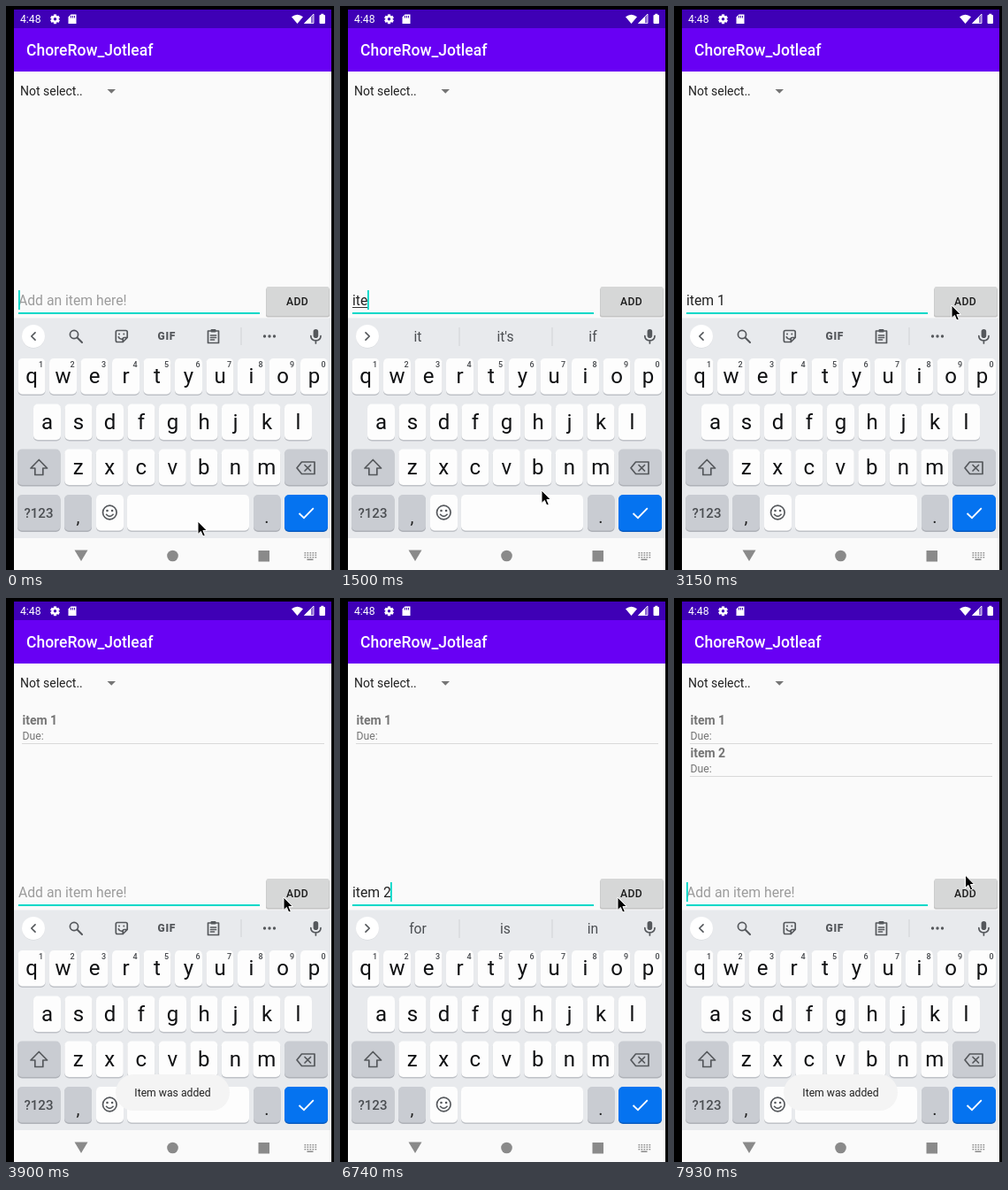
Write an HTML page that moves like this. It is 371 px wide and 637 px high and loops after 8000 ms.

```html
<!DOCTYPE html>
<html lang="en">
<head>
<meta charset="utf-8">
<title>Todo app</title>
<style>
html, body { margin: 0; width: 100%; height: 100%; overflow: hidden; background: #000; }
svg { display: block; width: 371px; height: 637px; font-family: Roboto, "Noto Sans", sans-serif; }
text { white-space: pre; }
.mid { text-anchor: middle; }
.line { fill: none; stroke: #55585c; stroke-width: 1.7; stroke-linejoin: round; stroke-linecap: round; }
</style>
</head>
<body>
<svg id="stage" viewBox="0 0 371 637" xmlns="http://www.w3.org/2000/svg"></svg>
<script>
const LOOP = 8000;
const TEAL = '#03d8c8', INK = '#55585c';

const rect = (x, y, w, h, fill, more = '') =>
  `<rect x="${x}" y="${y}" width="${w}" height="${h}" fill="${fill}" ${more}/>`;
const text = (x, y, size, fill, str, more = '') =>
  `<text x="${x}" y="${y}" font-size="${size}" fill="${fill}" ${more}>${str}</text>`;
const path = (d, more = `fill="${INK}"`) => `<path d="${d}" ${more}/>`;
const line = (d, more = '') => path(d, `class="line" ${more}`);
const circle = (x, y, r, more) => `<circle cx="${x}" cy="${y}" r="${r}" ${more}/>`;

function key(x, y, w, fill = '#fdfdfd', shade = '#bfc2c7') {
  return rect(x, y + 1, w, 41, shade, 'rx="5"') + rect(x, y, w, 40.5, fill, 'rx="5"');
}

function letters(row, x, y, digits) {
  return [...row].map((c, i) => {
    const cx = x + i * 35.5;
    return key(cx - 15.5, y, 31) +
      text(cx, y + 28, 24, '#101113', c, 'class="mid"') +
      (digits ? text(cx + 10.5, y + 10, 9, '#44474b', (i + 1) % 10, 'class="mid" font-weight="500"') : '');
  }).join('');
}

function gear(x, y) {
  let teeth = '';
  for (let a = 0; a < 180; a += 60)
    teeth += rect(x - 1.6, y - 5.4, 3.2, 10.8, '#fff', `transform="rotate(${a} ${x} ${y})"`);
  return teeth + circle(x, y, 2.9, 'fill="none" stroke="#fff" stroke-width="2.4"') +
    circle(x, y, 1.7, 'fill="#3f00b6"');
}

function header() {
  return rect(9, 4, 359, 633, '#fafafa') +
    rect(9, 4, 359, 21, '#3f00b6') + rect(9, 25, 359, 49, '#6800f4') +
    text(16, 19, 12.2, '#fff', '4:48') + gear(55.5, 14.8) +
    path('M73.5 9.5h6v10.500h-9v-7.500z', 'fill="#fff"') +
    path('M73.500 11v2.500M75.500 11v2.500M77.500 11v2.500', 'stroke="#3f00b6" stroke-width="1"') +
    path('M323 12.2Q329.500 7.200 336 12.200L329.500 20z', 'fill="#fff"') +
    path('M348 9V19.500H337.500z', 'fill="#fff" fill-opacity=".4"') +
    path('M345 12V19.500H337.500z', 'fill="#fff"') +
    path('M348 9V19.500H337.500z', 'fill="none" stroke="#fff" stroke-width=".8"') +
    rect(354.5, 10, 6.5, 10, '#fff', 'rx="1"') + rect(356.3, 8.8, 3, 2, '#fff') +
    text(23, 56, 17.5, '#fff', 'ChoreRow_Jotleaf', 'font-weight="500"') +
    text(16, 101, 14, '#222', 'Not select..') +
    path('M114.500 94h9.500l-4.750 4.800z', 'fill="#757575"');
}

function listRow(n) {
  const y = 127 + (n - 1) * 37;
  return `<g id="row${n}">` +
    text(18.5, y + 16, 14, '#747474', 'item ' + n, 'font-weight="700"') +
    text(18.5, y + 33.2, 12.2, '#757575', 'Due:') +
    rect(18, y + 37, 342, 1, '#d9d9d9') + '</g>';
}

function entry() {
  return text(14, 338, 15.73, '#9c9c9c', 'Add an item here!', 'id="hint"') +
    text(14, 338, 15.73, '#212121', '', 'id="typed"') +
    rect(14, 340, 0, 1, '#333', 'id="under"') +
    rect(14, 346, 273, 2, TEAL) +
    rect(14, 321, 1.8, 22, TEAL, 'id="caret"') +
    rect(294, 318.5, 72, 33, '#c3c3c3', 'rx="2"') +
    rect(294.5, 317, 71, 33, '#d6d7d7', 'rx="2" id="add"') +
    text(329.5, 337.6, 12.2, '#1d1d1d', 'ADD', 'class="mid" font-weight="500" letter-spacing=".3"');
}

function tools() {
  return '<g id="tools">' + line('M33 368.800l-4.200 4.200 4.200 4.200') +
    circle(77, 371, 4.6, 'class="line"') + line('M80.500 374.500l5.500 5.500', 'style="stroke-width:2"') +
    line('M126 366.500h9.500q1.700 0 1.700 1.700v6.300l-5 5h-6.200q-1.700 0-1.700-1.700v-9.600q0-1.700 1.700-1.700zM137 374.500h-3.300q-1.500 0-1.500 1.500v3.500M127.300 373.800q1.200 2.800 4 2.400') +
    circle(128, 370.6, 1, `fill="${INK}"`) + circle(133.3, 370.6, 1, `fill="${INK}"`) +
    text(181.8, 377.300, 12, INK, 'GIF', 'class="mid" font-weight="900" letter-spacing=".7"') +
    line('M228.500 367h12v13.500h-12zM231.500 372h6M231.500 374.500h6M231.500 377h4') +
    rect(231.5, 365, 6, 3.6, INK, 'rx="1"') +
    rect(265.5, 363, 1, 20, '#d0d2d6') +
    [292.5, 298, 303.500].map(x => circle(x, 373, 1.7, `fill="${INK}"`)).join('') + '</g>';
}

function words() {
  return '<g id="words">' + line('M29 368.800l4.200 4.200-4.200 4.200') +
    rect(134.5, 363, 1, 21, '#cfd1d5') + rect(239.5, 363, 1, 21, '#cfd1d5') +
    [88, 187, 286].map((x, i) => text(x, 379, 15.7, '#4b4e52', '', `class="mid" id="word${i}"`)).join('') +
    '</g>';
}

function keyboard() {
  const grey = '#c9ccd2', edge = '#aeb1b7';
  return rect(9, 352.500, 359, 248.500, '#e8eaed') +
    circle(31, 373.600, 13, 'fill="#d5d7da"') + circle(31, 373, 13, 'fill="#fff"') +
    tools() + words() +
    rect(347.6, 365, 5.6, 10, INK, 'rx="2.800"') + line('M344.800 372.500q0 5.300 5.600 5.300t5.600-5.300M350.400 378v3') +
    letters('qwertyuiop', 29, 398, true) +
    letters('asdfghjkl', 46.5, 449.5) +
    letters('zxcvbnm', 81.8, 500.5) +
    key(13, 500.5, 48.5, grey, edge) +
    line('M37.300 512.500l9.300 9.500h-4.800v7.500h-9v-7.500h-4.800z') +
    key(315, 500.5, 49, grey, edge) +
    line('M334.500 515h14.500v13.500h-14.500l-5.500-6.750zM338 518.500l6.500 6.500M344.500 518.500l-6.500 6.500') +
    key(13, 552, 48.5, grey, edge) +
    text(37, 578, 15, '#4b4e52', '?123', 'class="mid" font-weight="500"') +
    key(66, 552, 31, grey, edge) + text(81.5, 584, 20, '#222', ',', 'class="mid"') +
    key(102, 552, 31) +
    circle(117.3, 572, 7.8, 'class="line"') +
    circle(114.5, 570, 1.3, `fill="${INK}"`) + circle(120.1, 570, 1.3, `fill="${INK}"`) +
    line('M113.500 574.300q3.800 4.300 7.600 0') +
    key(137, 552, 138) +
    key(280, 552, 30.5, grey, edge) + text(295, 584, 20, '#222', '.', 'class="mid"') +
    key(315, 552, 49, '#0573f0', '#0a5cc0') +
    path('M331.500 573l5.500 5.200 10.800-11', 'fill="none" stroke="#fff" stroke-width="1.8"');
}

function navBar() {
  let dots = '';
  for (let i = 0; i < 15; i++)
    dots += rect(337.5 + i % 5 * 3, 617 + Math.floor(i / 5) * 2.5, 1.7, 1.4, '#8c8c8c');
  return rect(9, 601, 359, 36, '#fafafa') +
    path('M77.500 614.500h15l-7.500 12.500z', 'fill="#8a8a8a"') +
    circle(188.500, 621, 6.3, 'fill="#8a8a8a"') +
    rect(285.5, 615, 12.5, 12.5, '#8a8a8a') +
    dots + rect(340.5, 624.500, 7, 1.5, '#8c8c8c');
}

const get = id => document.getElementById(id);
get('stage').innerHTML = rect(0, 0, 371, 637, '#000') + header() + listRow(1) + listRow(2) +
  entry() + keyboard() + navBar() +
  '<g id="toast">' + rect(124, 538, 129, 41, '#f4f4f4', 'rx="20.500"') +
  text(188.5, 562.800, 12.2, '#222', 'Item was added', 'class="mid"') + '</g>' +
  path('M0 0V14.500L3.400 11.400L5.800 17L8.300 15.900L5.900 10.500H10.300z',
    'id="mouse" fill="#000" stroke="#fff" stroke-width="1"');

// Each step changes only the listed parts of the state.
const START = { typed: '', under: false, words: '', caret: true, rows: 0, press: false, toast: 0, mouse: [217, 582] };
const STEPS = [
  [150, { mouse: [219, 608] }],
  [300, { mouse: [228, 547], caret: false }],
  [750, { caret: true }],
  [900, { typed: 'i', under: true }],
  [1200, { typed: 'it', words: "I I'm in" }],
  [1350, { words: "it it's if" }],
  [1500, { typed: 'ite' }],
  [1650, { words: 'items item iterate' }],
  [1800, { typed: 'item' }],
  [1950, { words: 'item items itemized' }],
  [2100, { typed: 'item ' }],
  [2250, { under: false, words: 'for is in' }],
  [2550, { typed: 'item 1' }],
  [2700, { words: '', mouse: [240, 510] }],
  [2850, { mouse: [276, 430] }],
  [3000, { mouse: [308, 356] }],
  [3150, { mouse: [314, 338], caret: false }],
  [3300, { press: true }],
  [3450, { typed: '', rows: 1, caret: true }],
  [3600, { press: false, toast: .35 }],
  [3750, { toast: .8 }],
  [3900, { toast: 1, caret: false }],
  [4350, { caret: true }],
  [4650, { typed: 'i', under: true }],
  [4800, { words: "I I'm in" }],
  [4950, { typed: 'it' }],
  [5090, { words: "it it's if" }],
  [5390, { typed: 'ite' }],
  [5540, { words: 'items item iterate', toast: .6 }],
  [5690, { typed: 'item', toast: 0 }],
  [5840, { words: 'item items itemized' }],
  [6140, { typed: 'item ' }],
  [6290, { under: false, words: 'for is in' }],
  [6740, { typed: 'item 2' }],
  [6890, { words: '' }],
  [7190, { press: true }],
  [7330, { caret: false }],
  [7480, { typed: '', rows: 2, caret: true }],
  [7630, { press: false, toast: .35 }],
  [7780, { toast: .8, mouse: [320, 328] }],
  [7930, { toast: 1, mouse: [329.5, 313] }]
];

const show = (id, on) => get(id).setAttribute('visibility', on ? 'visible' : 'hidden');

function draw(t) {
  const s = Object.assign({}, START);
  for (const [at, change] of STEPS) if (at <= t) Object.assign(s, change);

  get('typed').textContent = s.typed;
  const width = s.typed ? get('typed').getComputedTextLength() : 0;
  show('hint', !s.typed);
  show('caret', s.caret);
  get('caret').setAttribute('x', 14 + Math.max(0, Math.round(width - .8)));
  show('under', s.under);
  get('under').setAttribute('width', s.typed.endsWith(' ') ? width - 4 : width);

  show('tools', !s.words);
  show('words', s.words);
  const list = s.words.split(' ');
  for (let i = 0; i < 3; i++) get('word' + i).textContent = list[i] || '';

  show('row1', s.rows > 0);
  show('row2', s.rows > 1);
  get('add').setAttribute('fill', s.press ? '#c6c7c7' : '#d6d7d7');
  get('toast').setAttribute('opacity', s.toast);
  get('mouse').setAttribute('transform', `translate(${s.mouse})`);
}

const begin = performance.now();
function tick() {
  draw((performance.now() - begin) % LOOP);
  requestAnimationFrame(tick);
}
tick();
</script>
</body>
</html>
```
